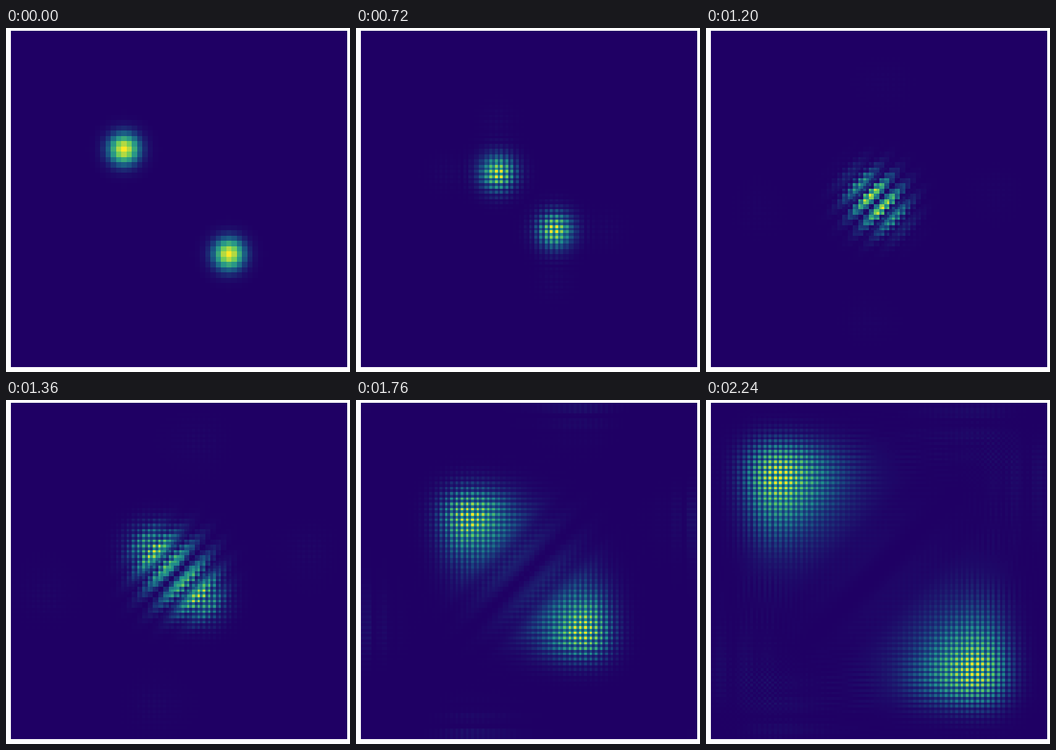
Animation, 490 px wide and 490 px high, one loop 2.32 s. Source, as an HTML page with a canvas:

```html
<!DOCTYPE html>
<html lang="en">
<head>
<meta charset="utf-8">
<title>Two colliding wave packets</title>
<style>
  html, body { margin: 0; width: 100%; height: 100%; overflow: hidden; background: #fff; }
  canvas { display: block; width: 490px; height: 490px; }
</style>
</head>
<body>
<canvas id="stage" width="490" height="490"></canvas>
<script>
// Two identical fermions on a line of sites. Each site holds a left-moving
// and a right-moving component; the picture is the joint probability.
const SITES = 64, SIZE = 2 * SITES;
const LOOP = 2320, HOLD = 480, TICK = 80, FRAMES = 24, STEPS_PER_FRAME = 4;
const HOP = 0.39, MASS = Math.sqrt(1 - HOP * HOP);
const STOPS = [[31, 0, 100], [25, 72, 128], [33, 145, 140], [94, 201, 98], [253, 231, 37]];

const palette = Array.from({ length: 256 }, (_, i) => {
  const pos = i / 255 * (STOPS.length - 1);
  const low = Math.min(Math.floor(pos), STOPS.length - 2);
  return STOPS[low].map((c, ch) => c + (STOPS[low + 1][ch] - c) * (pos - low));
});

// Components alternate: index 2x moves left, index 2x + 1 moves right.
function packet(center, momentum) {
  const re = new Float64Array(SIZE), im = new Float64Array(SIZE);
  for (let i = 0; i < SIZE; i++) {
    const d = (i >> 1) - center, amp = Math.exp(-d * d / 16);
    re[i] = amp * Math.cos(momentum * d);
    im[i] = amp * Math.sin(momentum * d);
  }
  return { re, im };
}

// One Dirac walk step: hop along the own direction, or turn around with phase i.
function step({ re, im }) {
  const outRe = new Float64Array(SIZE), outIm = new Float64Array(SIZE);
  const add = (to, from, hop, turn) => {
    outRe[to] += hop * re[from] - turn * im[from];
    outIm[to] += hop * im[from] + turn * re[from];
  };
  for (let i = 1; i < SIZE - 1; i += 2) {
    add(i - 1, i + 1, HOP, 0);
    add(i - 1, i, 0, MASS);
    add(i + 2, i, HOP, 0);
    add(i + 2, i + 1, 0, MASS);
  }
  add(SIZE - 2, SIZE - 1, 0, 1);
  add(1, 0, 0, 1);
  return { re: outRe, im: outIm };
}

function density(a, b) {
  const out = new Float64Array(SIZE * SIZE);
  for (let j = 0; j < SIZE; j++) {
    for (let i = 0; i < SIZE; i++) {
      const re = a.re[i] * b.re[j] - a.im[i] * b.im[j] - b.re[i] * a.re[j] + b.im[i] * a.im[j];
      const im = a.re[i] * b.im[j] + a.im[i] * b.re[j] - b.re[i] * a.im[j] - b.im[i] * a.re[j];
      out[(SIZE - 1 - j) * SIZE + i] = re * re + im * im;
    }
  }
  return out;
}

function paint(values) {
  const tile = document.createElement('canvas');
  tile.width = tile.height = SIZE;
  const ctx = tile.getContext('2d'), image = ctx.createImageData(SIZE, SIZE);
  const peak = values.reduce((m, v) => Math.max(m, v), 0);
  values.forEach((v, i) => {
    image.data.set([...palette[Math.round(v / peak * 255)], 255], 4 * i);
  });
  ctx.putImageData(image, 0, 0);
  return tile;
}

let right = packet(21, -Math.PI / 4), left = packet(41, Math.PI / 4);
const tiles = [];
for (let k = 0; k < FRAMES; k++) {
  tiles.push(paint(density(right, left)));
  for (let s = 0; s < STEPS_PER_FRAME; s++) {
    right = step(right);
    left = step(left);
  }
}

const stage = document.getElementById('stage').getContext('2d');
stage.imageSmoothingEnabled = false;
const start = performance.now();

function draw() {
  const t = (performance.now() - start) % LOOP;
  const k = t < HOLD ? 0 : Math.min(FRAMES - 1, 1 + Math.floor((t - HOLD) / TICK));
  stage.drawImage(tiles[k], 7, 4, 479, 479);
  requestAnimationFrame(draw);
}
draw();
</script>
</body>
</html>
```
